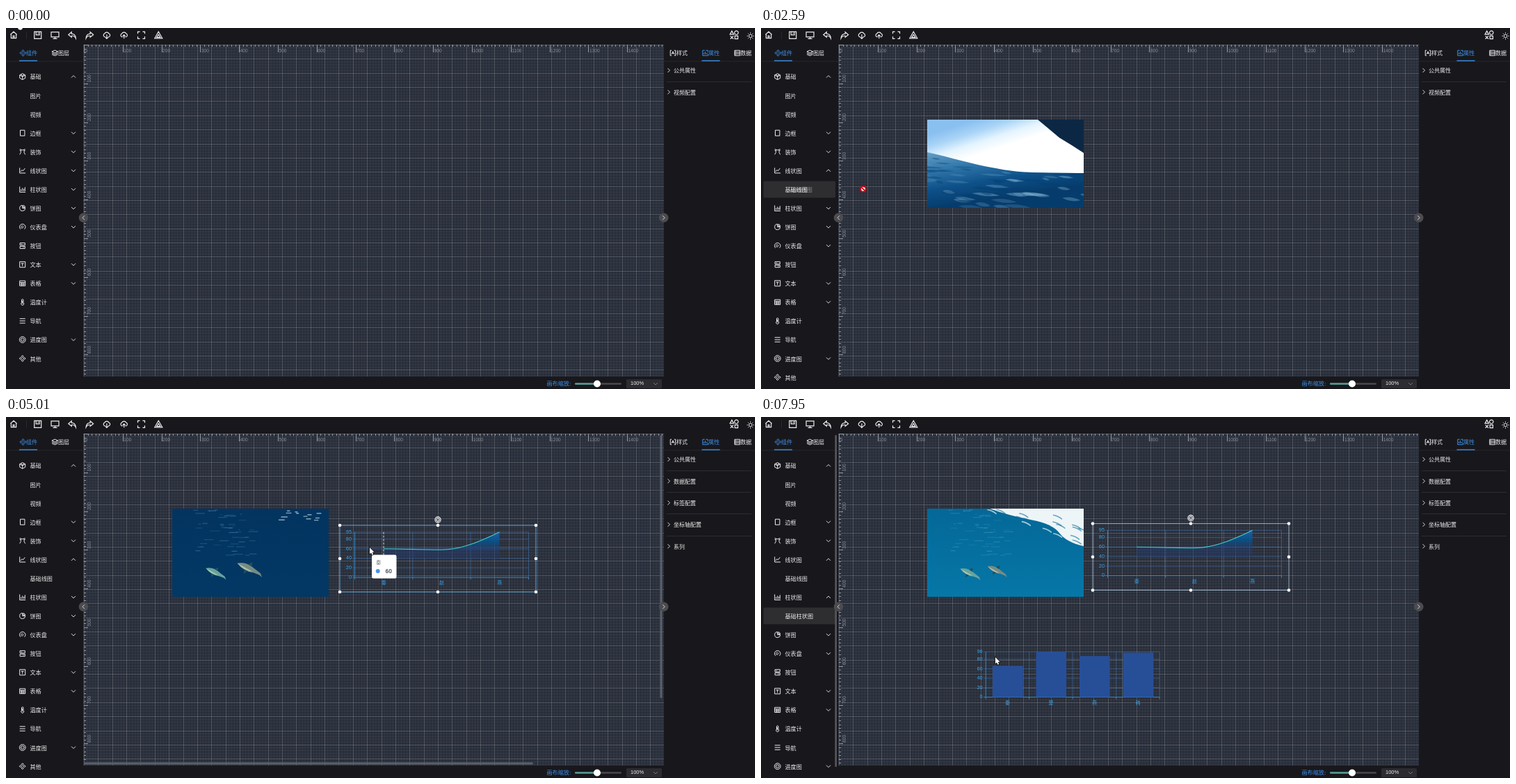
Write an HTML page with a canvas that moves like this. It is 1077x520 px and loops after 8 s.

```html
<!DOCTYPE html>
<html lang="zh">
<head>
<meta charset="utf-8">
<style>
html, body { margin: 0; width: 100%; height: 100%; overflow: hidden; background: #18181c; }
canvas { display: block; width: 1077px; height: 520px; }
</style>
</head>
<body>
<canvas id="stage" width="1077" height="520"></canvas>
<script>
const ctx = document.getElementById('stage').getContext('2d');
const LOOP = 8000, BLUE = '#3d8fe8', WHITE = '#ececee';
const CJK = '"Noto Sans CJK SC", "Noto Sans CJK", "Noto Sans", sans-serif';
const LATIN = '"Liberation Sans", sans-serif';

// time, cursor kind, tip x, tip y, highlighted menu row
const steps = [
  [0, '', 0, 0, -1], [90, 'hand', 38, 20, -1], [405, 'hand', 50, 118, 2],
  [720, 'no', 150, 160, 2], [1035, 'arrow', 290, 175, -1], [1350, 'hand', 90, 191, -1],
  [1680, 'hand', 80, 201, 5], [1980, 'hand', 62, 214, 5], [2280, 'hand', 55, 229, 6],
  [2590, 'no', 147, 232, 6], [2890, 'hand', 265, 218, 6], [3200, 'hand', 400, 200, 6],
  [3500, 'hand', 525, 186, 6], [3800, 'hand', 590, 178, 6], [4100, 'hand', 590, 178, 6],
  [4400, 'arrow', 560, 190, -1], [4700, 'arrow', 530, 190, -1], [5010, 'arrow', 523, 188, -1],
  [5290, 'arrow', 520, 185, -1], [5570, 'arrow', 400, 215, -1], [5860, 'arrow', 190, 250, -1],
  [6150, 'hand', 81, 263, 8], [6450, 'hand', 75, 256, 7], [6730, 'hand', 60, 281, 8],
  [7040, 'no', 145, 300, 8], [7340, 'hand', 240, 330, 8], [7650, 'hand', 330, 345, 8],
  [7950, 'arrow', 337, 346, 8]
];

// icons on a 24 unit box
const cloud = 'M8 17H6A5 5 0 0 1 6 7.5 6.5 6.5 0 0 1 18 7.5 5 5 0 0 1 18 17H16';
const icons = {
  home: 'M2 11L12 2 22 11M4 10V22H20V10M10 22V15H14V22',
  save: 'M2 2H22V22H2ZM7 2V11H17V2M13 5V8',
  screen: 'M1 3H23V17H1ZM12 17V22M6 22H18',
  undo: 'M10 3L1 11 10 18V14Q18 13 22 21 21 8 10 8Z',
  redo: 'M14 3L23 11 14 18V14Q6 13 2 21 3 8 14 8Z',
  down: cloud + 'M12 10V22M8 18L12 22 16 18',
  up: cloud + 'M12 22V11M8 15L12 11 16 15',
  full: 'M2 8V2H8M16 2H22V8M22 16V22H16M8 22H2V16',
  warn: 'M12 2L23 21H1ZM12 10L17 18H7Z',
  shapes: 'M6 1L11 10H1ZM13 5.5a5 5 0 1 0 10 0a5 5 0 1 0-10 0M2 14L10 22M10 14L2 22M14 14H22V22H14Z',
  sun: 'M7 12a5 5 0 1 0 10 0a5 5 0 1 0-10 0M12 1V4M12 20V23M1 12H4M20 12H23M4 4L6 6M18 18L20 20M4 20L6 18M18 6L20 4',
  parts: 'M12 1L16 5 12 9 8 5ZM12 15L16 19 12 23 8 19ZM5 8L9 12 5 16 1 12ZM19 8L23 12 19 16 15 12Z',
  layers: 'M12 2L23 7 12 12 1 7ZM1 12L12 17 23 12M1 17L12 22 23 17',
  cube: 'M12 1L22 6.5V17.5L12 23 2 17.5V6.5ZM2 6.5L12 12 22 6.5M12 12V23M7 3.5L12 12 17 3.5',
  frame: 'M4 2H20V22H4Z',
  deco: 'M2 3Q12 9 22 3M6 6V15L2 22M18 6V15L22 22M2 8L6 6M22 8L18 6',
  line: 'M2 2V21H23M5 16L10 10 14 13 21 4',
  bars: 'M2 2V22H23M7 18V12M12 18V7M17 18V10M21 18V4',
  pie: 'M12 2A10 10 0 1 0 22 12H12ZM15 2A9 9 0 0 1 22 9H15Z',
  gauge: 'M5 20A10.5 10.5 0 1 1 19 20M9 17A6 6 0 0 1 12 7M12 17L15 9',
  button: 'M3 2H21V10H3ZM3 14H21V22H3ZM7 6H10M14 18H17',
  text: 'M2 2H22V22H2ZM7 8H17M12 8V18',
  table: 'M2 3H22V21H2ZM2 9H22M2 15H22M9 9V21M15 9V21',
  temp: 'M9 3Q12 0 15 3V14A5 5 0 1 1 9 14ZM12 7V18',
  nav: 'M2 4H22M2 12H22M2 20H22',
  ring: 'M1 12a11 11 0 1 0 22 0a11 11 0 1 0-22 0M6 12a6 6 0 1 0 12 0a6 6 0 1 0-12 0M11 12H13',
  style: 'M7 2H2V22H7M17 2H22V22H17M7 17L12 6 17 17M9 13H15',
  props: 'M10 2H2V22H22V14M14 2H22V10M7 11V17M12 7V17M17 12V17',
  data: 'M2 2H22V22H2ZM2 9H22M2 15H22M5 5.5H7M5 12H7M5 18.5H7'
};

const menu = [
  ['基础', 'cube', 1], ['边框', 'frame', 1], ['装饰', 'deco', 1], ['线状图', 'line', 1],
  ['柱状图', 'bars', 1], ['饼图', 'pie', 1], ['仪表盘', 'gauge', 1], ['按钮', 'button', 0],
  ['文本', 'text', 1], ['表格', 'table', 1], ['温度计', 'temp', 0], ['导航', 'nav', 0],
  ['进度图', 'ring', 1], ['其他', 'parts', 0]
];

function rect(x, y, w, h, color, r = 0) {
  ctx.fillStyle = color;
  ctx.beginPath();
  ctx.roundRect(x, y, w, h, r);
  ctx.fill();
}
function dot(x, y, r, color) {
  ctx.fillStyle = color;
  ctx.beginPath();
  ctx.arc(x, y, r, 0, 7);
  ctx.fill();
}
function stroke(path, color, width = 1) {
  ctx.strokeStyle = color;
  ctx.lineWidth = width;
  ctx.stroke(new Path2D(path));
}
function fill(path, paint) {
  ctx.fillStyle = paint;
  ctx.fill(new Path2D(path));
}
function text(s, x, y, color = WHITE, size = 8.1, align = 'left', font = CJK, weight = 500) {
  ctx.font = `${weight} ${size}px ${font}`;
  ctx.fillStyle = color;
  ctx.textAlign = align;
  ctx.textBaseline = 'middle';
  ctx.fillText(s, x, y + .4);
}
function at(x, y, draw, scale = 1) {
  ctx.save();
  ctx.translate(x, y);
  ctx.scale(scale, scale);
  draw();
  ctx.restore();
}
function icon(name, x, y, size = 10, color = WHITE, width = 1) {
  const k = size / 24;
  at(x - size / 2, y - size / 2, () => stroke(icons[name], color, width / k), k);
}
function chevron(x, y, dir, color = '#d8d8da') {
  const shapes = { up: 'M-3 1.5L0-1.5 3 1.5', down: 'M-3-1.5L0 1.5 3-1.5', left: 'M1.5-3L-1.5 0 1.5 3', right: 'M-1.5-3L1.5 0-1.5 3' };
  at(x, y, () => stroke(shapes[dir], color));
}
function gradient(x0, y0, x1, y1, ...colors) {
  const g = ctx.createLinearGradient(x0, y0, x1, y1);
  colors.forEach((c, i) => g.addColorStop(i / (colors.length - 1), c));
  return g;
}
const mix = (a, b, k) => `rgb(${a.map((v, i) => Math.round(v + (b[i] - v) * k))})`;
const clamp = v => Math.max(0, Math.min(1, v));
function randomizer(seed) {
  return () => (seed = seed * 16807 % 2147483647) / 2147483647;
}

function drawBoard() {
  rect(111, 24, 835, 478, '#282e3a');
  ctx.save();
  ctx.beginPath();
  ctx.rect(111, 24, 835, 478);
  ctx.clip();
  const gap = 20.36 / 5;
  for (let i = 0; i < 206; i++) {
    const major = i % 5 === 0, color = major ? 'rgba(255,255,255,.18)' : 'rgba(255,255,255,.05)';
    const p = i * gap, snap = v => major ? Math.round(v) : v;
    rect(snap(112 + p), 24, 1, 478, color);
    if (p < 478) rect(111, snap(24 + p), 835, 1, color);
  }
  const mark = '#969ba3', label = '#868c96';
  for (let i = 0; i < 150; i++) {
    const p = i * 5.58, major = i % 10 === 0;
    rect(Math.round(112 + p), 24, 1, major ? 11 : 3, mark);
    if (p < 478) rect(112, Math.round(24 + p), major ? 6 : 3, 1, mark);
    if (!major) continue;
    text(i * 10, 113.5 + p, 33, label, 6.6, 'left', LATIN, 400);
    if (i && p < 478) at(120, 22.5 + p, () => {
      ctx.rotate(-Math.PI / 2);
      text(i * 10, 0, 0, label, 6.6, 'left', LATIN, 400);
    });
  }
  ctx.restore();
}

function drawHeader() {
  icon('home', 11, 10, 11, WHITE, 1.2);
  rect(29, 5, 1, 11, '#29292d');
  ['save', 'screen', 'undo', 'redo', 'down', 'up', 'full', 'warn']
    .forEach((n, i) => icon(n, 45.7 + i * 24.8, 10.3, 12, WHITE, 1.2));
  icon('shapes', 1047, 10.3, 13, WHITE, 1.2);
  icon('sun', 1070.5, 11.5, 11);
}

function drawMenu(t, hover) {
  rect(0, 47.5, 111, 1, '#29292d');
  icon('parts', 24.5, 36, 10, BLUE);
  text('组件', 29, 36, BLUE);
  rect(19, 46.5, 26, 1.4, BLUE);
  icon('layers', 70.3, 36, 9.5);
  text('图层', 75, 36);
  const open = {
    基础: ['图片', '视频'],
    线状图: t >= 1980 ? ['基础线图'] : [],
    柱状图: t >= 6450 ? ['基础柱状图'] : []
  };
  let row = 0;
  const nextY = () => {
    const y = 70 + 27.07 * row;
    if (row++ === hover) rect(3.5, y - 12, 103.5, 24, '#2e2e31', 1.5);
    return y;
  };
  for (const [name, pic, folds] of menu) {
    const y = nextY(), kids = open[name] || [];
    if (y > 515) break;
    icon(pic, 23.7, y, 9.6);
    text(name, 34.5, y);
    if (folds) chevron(97, y, kids.length ? 'up' : 'down');
    kids.forEach(k => text(k, 34.5, nextY()));
  }
  if (t === 2590) {
    ctx.globalAlpha = .5;
    text('基础线图', 41.5, 232.4);
    ctx.globalAlpha = 1;
  }
  if (t >= 6450) rect(106.3, 26, 2.7, 478, '#56565a', 1.3);
}

function drawPanel(t) {
  rect(946, 47.5, 131, 1, '#29292d');
  icon('style', 959, 36, 9);
  text('样式', 964, 36);
  icon('props', 1005.5, 36, 9, BLUE);
  text('属性', 1010, 36, BLUE);
  rect(1000.5, 46.5, 26, 1.4, BLUE);
  icon('data', 1051.5, 36, 9);
  text('数据', 1056, 36);
  const rows = t >= 4700 ? ['公共属性', '数据配置', '标签配置', '坐标轴配置', '系列'] : ['公共属性', '视频配置'];
  rows.forEach((name, i) => {
    const y = 61 + i * 31.3;
    chevron(953, y, 'right');
    text(name, 960, y, WHITE, 8);
    if (i) rect(950, Math.round(y - 15.5), 122, 1, '#2d2d31');
  });
}

function drawFooter() {
  text('画布缩放:', 777.5, 512, BLUE);
  rect(818, 511.3, 67, 2.4, '#4a4a4e', 1.2);
  rect(818, 511.3, 32, 2.4, '#529c96', 1.2);
  dot(850, 512.5, 5, '#fff');
  rect(892, 506, 51, 13, '#2d2d31', 1.5);
  text('100%', 898, 512, WHITE, 7.5, 'left', LATIN);
  chevron(934, 512.5, 'down', '#77777b');
}

function drawSplash() {
  fill('M0 0H225V127H0Z', gradient(0, 0, 70, 110, '#6fb6ee', '#c2efff', '#fff'));
  fill('M130 0H225V70L190 40 165 20Z', '#8d949b');
  fill('M150 0H225V30L205 26 172 12Z', '#26395c');
  fill('M0 43C70 44 100 85 225 88V127H0Z', gradient(0, 45, 200, 125, '#3f86c0', '#4f78b0', '#a3a7ab'));
  fill('M0 78C60 52 105 100 170 127H0Z', 'rgba(42,92,150,.6)');
  stroke('M0 68C50 52 100 72 150 96M10 88C50 76 90 98 120 110', 'rgba(195,225,240,.6)', 3);
}

function drawSea(t) {
  const k = clamp((t - 2590) / 1210);
  fill('M0 0H225V127H0Z', gradient(70, 0, 90, 62, mix([138, 192, 240], [122, 178, 226], k), '#a9d4f6', '#e4f4ff', '#fff', '#fff'));
  ctx.save();
  const sea = new Path2D(`M0 ${47 + 3 * k}C50 ${58 + k * 6} 95 ${74 + k} 150 76T225 ${77 - k}V127H0Z`);
  ctx.fillStyle = gradient(0, 50, 12, 127, '#5f9ac2', '#2e74a8', '#0d5088', '#063c6c');
  ctx.fill(sea);
  ctx.clip(sea);
  const rnd = randomizer(71 + Math.floor(t / 300));
  for (let i = 0; i < 110; i++) {
    const x = rnd() * 250 - 25, depth = rnd(), y = 50 + depth * 76;
    const w = 10 + rnd() * 34, h = 1 + depth * 3;
    const color = i % 3 ? `rgba(6,62,112,${.2 + rnd() * .3})` : `rgba(140,188,214,${.15 + rnd() * .3})`;
    fill(`M${x} ${y}q${w / 2} ${-h} ${w} ${h}q${-w / 2} ${h} ${-w} ${-h}Z`, color);
  }
  ctx.restore();
  const edge = 159 + 9 * k;
  fill(`M${edge} 0H225V${48 - 6 * k}L208 ${37 - 2 * k} 190 ${26 - 2 * k} ${edge + 12} 10Z`, '#0c2744');
}

function drawDolphin(x, y, size, tint) {
  at(x, y, () => {
    ctx.rotate(.28);
    fill('M-18-3Q-5-10 10-2L20 2 24 7 19 5 10 4Q-4 7-18-3Z', tint);
    fill('M-2-6L4-11 5-4ZM-5 3L-4 10 1 4Z', '#204f5b');
    fill('M-17-3Q-5 6 8 3-5 0-17-3Z', 'rgba(205,225,195,.6)');
  }, size);
}

function drawUnderwater(t) {
  const k = clamp((t - 5010) / 2940), rise = clamp((t - 6150) / 1800);
  fill('M0 0H225V127H0Z', gradient(0, 0, 0, 127, mix([3, 52, 96], [4, 104, 151], k), mix([3, 56, 101], [6, 119, 168], k)));
  const rnd = randomizer(23);
  for (let i = 0; i < 48; i++) {
    const x = 30 + rnd() * 82, y = rnd() * 68, w = 3 + rnd() * 12;
    rect(x, y, w, 1.2, `rgba(100,175,205,${.12 + rnd() * .25})`, 1);
  }
  for (let i = 0; i < 12; i++) rect(145 + rnd() * 75, rnd() * 16, 4 + rnd() * 6, 1.4, 'rgba(200,230,240,.65)', 1);
  if (rise > 0) {
    const h = rise * 54;
    fill(`M${225 - 135 * rise} 0H225V${h}Q200 ${h * .9} 190 ${h * .65}T150 ${h * .3}T${225 - 135 * rise} 0Z`, '#edf5f7');
    for (let i = 0; i < 35; i++) {
      const x = 80 + rnd() * 140, y = (x - 80) / 140 * h * rnd();
      stroke(`M${x} ${y}q7 1 13 6`, i % 2 ? 'rgba(20,110,155,.6)' : 'rgba(235,245,248,.7)', 1.6);
    }
  }
  drawDolphin(61 - 6 * Math.sin(k * 3), 92 + 5 * Math.sin(k * 3), .78, '#68a39b');
  drawDolphin(109 - 10 * rise, 86 + 3 * rise, .95 - .2 * rise, '#748c84');
}

function drawControls() {
  fill('M0 0H225V127H0Z', gradient(0, 75, 0, 127, 'rgba(20,24,30,0)', 'rgba(20,24,30,.4)', 'rgba(20,22,26,.95)'));
  rect(0, 119, 225, 8, '#1c1e23');
  rect(10.5, 96, 2, 7, '#fff');
  rect(14.5, 96, 2, 7, '#fff');
  text('0:00 / 0:15', 27, 99.5, '#fff', 8.4, 'left', LATIN);
  fill('M154 98H156L159 95V104L156 101H154Z', '#fff');
  stroke('M161 96Q164 99.5 161 103M153 95L163 104', '#fff');
  icon('full', 185, 99.5, 7, '#fff');
  [-3, 0, 3].forEach(d => dot(212, 99.5 + d, 1, '#fff'));
  rect(9, 113.5, 207, 2, '#b9bbbe', 1);
  rect(9, 113.5, 5, 2, '#fff', 1);
}

function drawVideo(t) {
  at(239, 132, () => {
    ctx.beginPath();
    ctx.rect(0, 0, 225, 127);
    ctx.clip();
    const scene = t < 1680 ? drawSplash : t < 4400 ? drawSea : drawUnderwater;
    scene(t);
    if (t < 1680) drawControls();
  });
}

// axes in a 282 by 96 box
function drawAxes(max, names) {
  const w = 250 / names.length, yOf = v => 75 - v * 65.3 / max;
  for (const v of [0, 20, 40, 60, 80, max]) {
    const y = yOf(v);
    rect(18.5, y - .5, 253, 1, v ? 'rgba(65,125,195,.5)' : '#3587c0');
    text(v, 17, y - .5, '#3aa0e6', 7.4, 'right', LATIN);
  }
  for (let i = 0; i <= names.length; i++) {
    rect(21 + i * w, 9.7, 1, 65.3, i ? 'rgba(65,125,195,.5)' : '#3587c0');
    rect(21 + i * w, 75, 1, 3, '#3587c0');
  }
  names.forEach((n, i) => text(n, 21.5 + (i + .5) * w, 82, '#3aa0e6', 7, 'center'));
  return yOf;
}

function drawLineChart(t) {
  const moved = t >= 5290;
  at(moved ? 477 : 480, moved ? 153.5 : 156, () => {
    drawAxes(95, ['秦', '赵', '燕']);
    const curve = 'M63 33.8C90 34 122 35.2 146 35.2C172 35.2 196 26 229.5 9.7';
    fill(curve + 'V48H63Z', gradient(0, 10, 0, 48, 'rgba(32,98,185,.85)', 'rgba(4,85,140,.9)', 'rgba(32,62,120,.5)', 'rgba(36,56,105,.4)'));
    stroke(curve, '#43cfc4', 1.1);
    if (t < 4700) return;
    stroke('M0 0H282V96H0Z', moved ? '#93a7bb' : '#62a7d8');
    for (const x of [0, 141, 282]) for (const y of [0, 48, 96])
      if (x !== 141 || y !== 48) dot(x, y, 2.3, '#fff');
    icon('ring', 141, -8, 9, '#fff', 1.1);
    if (t !== 5010 && t !== 5290) return;
    ctx.setLineDash([3, 2]);
    stroke('M63 9.7V75', '#d8dce2');
    ctx.setLineDash([]);
    rect(46, 42.5, 35.5, 34, '#fff', 2.5);
    text('秦', 52, 52.5, '#70757c', 7.4);
    dot(54.7, 66, 3, '#4b90f0');
    text('60', 65.5, 66, '#555a62', 8.6, 'left', LATIN, 700);
  });
}

function drawBarChart() {
  at(301.7, 328.5, () => {
    const yOf = drawAxes(96, ['秦', '楚', '燕', '韩']);
    [66, 96, 87, 94].forEach((v, i) => rect(31.3 + i * 62.5, yOf(v), 43.7, 75 - yOf(v), '#274f98'));
  });
}

function drawCursor(kind, x, y) {
  at(x, y, () => {
    if (kind === 'no') {
      dot(0, 0, 4, '#fff');
      stroke('M-3.8 0a3.8 3.8 0 1 0 7.6 0a3.8 3.8 0 1 0-7.6 0M-2.7-2.7L2.7 2.7', '#d4000f', 1.9);
    } else if (kind) {
      const path = kind === 'hand'
        ? 'M0 1V8L-2 6.5Q-3.3 7-2.5 8.3L0 12.2V13.2H6V12L7 9V5.5Q5 4 1.8 4.2V1Q1-.6 0 1Z'
        : 'M0 0V9.3L2 7.4 3.6 10.7 5.2 10 3.7 6.8H6.6Z';
      stroke(path, '#111', 1.4);
      fill(path, '#fff');
    }
  });
}

function draw([t, kind, x, y, hover]) {
  rect(0, 0, 1077, 520, '#18181c');
  drawBoard();
  if (t >= 1035) drawVideo(t);
  if (t >= 4400) drawLineChart(t);
  if (t >= 7950) drawBarChart();
  if (t === 1035 || t === 1350 || (t >= 4400 && t <= 5290)) {
    rect(112, 497.5, 646, 3, '#5b616b', 1.5);
    rect(940.5, 26, 3, 379, '#5b616b', 1.5);
  }
  drawHeader();
  drawMenu(t, hover);
  drawPanel(t);
  drawFooter();
  [[111.5, 'left'], [945.7, 'right']].forEach(([cx, dir]) => {
    dot(cx, 273.3, 6.8, '#4b4b50');
    chevron(cx, 273.3, dir);
  });
  if (!t) dot(20.5, -.5, 3.3, '#fff');
  drawCursor(kind, x, y);
}

const start = performance.now();
let shown;
function tick() {
  const t = (performance.now() - start) % LOOP;
  const step = steps.findLast(s => s[0] <= t);
  if (step !== shown) draw(shown = step);
  requestAnimationFrame(tick);
}
tick();
</script>
</body>
</html>
```
